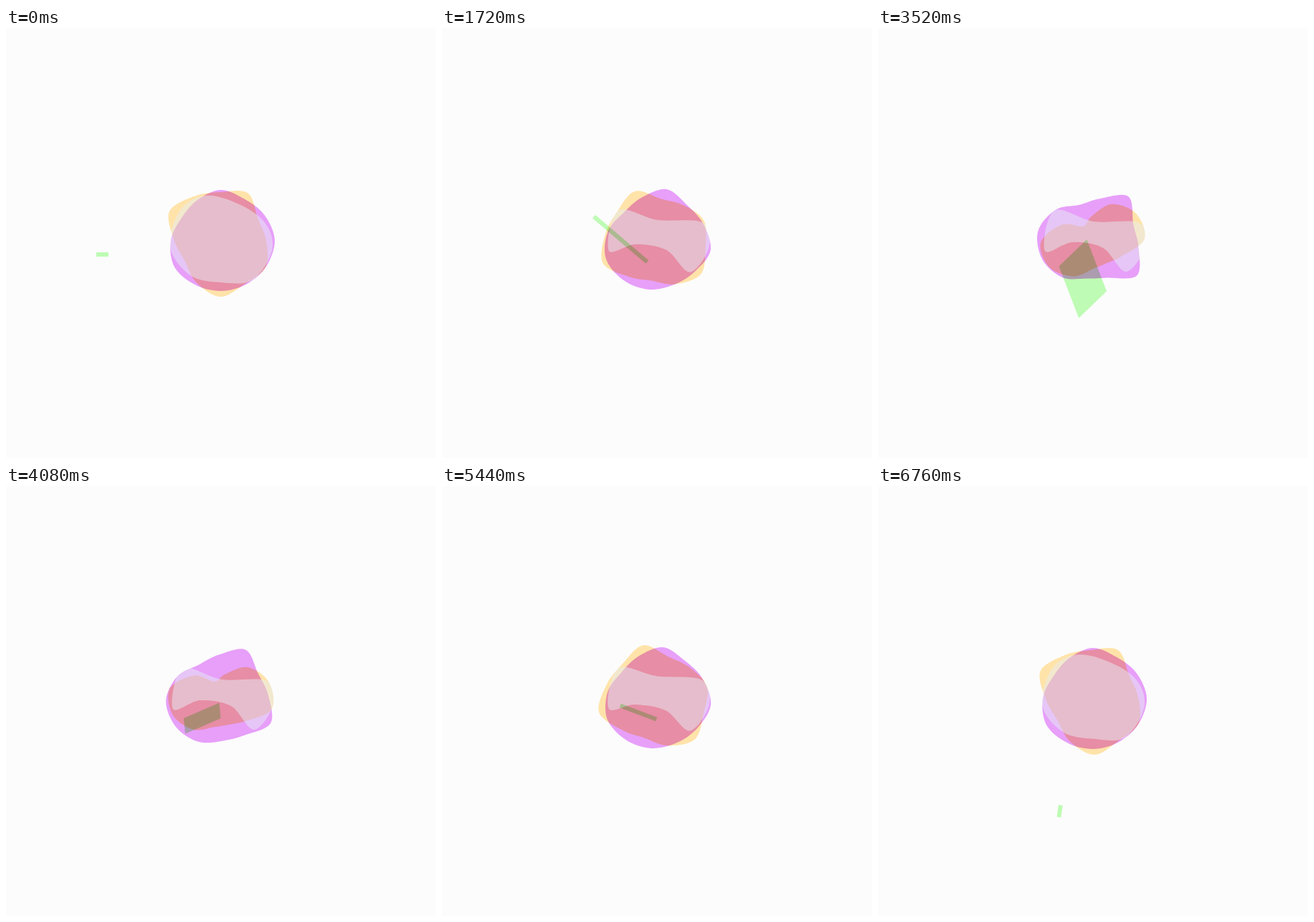
An HTML page with a canvas that plays this animation: 600 px wide and 600 px high, repeating every 6.8 s.

```html
<!DOCTYPE html>
<html>
<head>
<meta charset="utf-8">
<style>
html, body { margin: 0; height: 100%; overflow: hidden; background: #fcfcfc; }
canvas { display: block; }
</style>
</head>
<body>
<canvas id="c" width="600" height="600"></canvas>
<script>
const ctx = document.getElementById('c').getContext('2d');
const LOOP = 6800, HALF = LOOP / 2, RAD = Math.PI / 180;

const clamp = x => Math.max(0, Math.min(1, x));
const mix = (a, b, k) => a + (b - a) * k;
const ease = x => x < .5 ? 2 * x * x : 1 - 2 * (1 - x) * (1 - x);
const smooth = (a, b, x) => { const k = clamp((x - a) / (b - a)); return k * k * (3 - 2 * k); };

// Two blobs turn while their radii, taken at equal angles, morph
const orange = {
  x: 299, y: 297, turn: -95, color: '#ffe3a9',
  from: [64, 73, 69, 78, 67, 57, 64, 82, 72, 68, 77, 61],
  to: [34, 58, 72, 73, 46, 37, 39, 56, 70, 72, 48, 24],
  spin: p => p ** .85, morph: p => smooth(.45, .85, p)
};
const purple = {
  x: 300, y: 296, turn: 42, color: '#e79ff9',
  from: [75, 73, 71, 71, 72, 75, 70, 63, 65, 70, 66, 70],
  to: [79, 55, 53, 67, 76, 78, 67, 52, 58, 79, 60, 64],
  spin: p => p * p, morph: p => p * p
};

// The light patch narrows from a disc to a wavy band
const disc = [[288, 234], [352, 262], [372, 305], [345, 351], [300, 355], [257, 345], [229, 305], [245, 252]];
const band = [[301, 270], [364, 272], [373, 305], [346, 340], [314, 307], [271, 299], [233, 311], [246, 255]];

function fillSmooth(pts, color, mode) {
  const n = pts.length, at = i => pts[(i + n) % n];
  ctx.beginPath();
  ctx.moveTo(...pts[0]);
  pts.forEach((b, i) => {
    const a = at(i - 1), c = at(i + 1), d = at(i + 2);
    ctx.bezierCurveTo(
      b[0] + (c[0] - a[0]) / 6, b[1] + (c[1] - a[1]) / 6,
      c[0] - (d[0] - b[0]) / 6, c[1] - (d[1] - b[1]) / 6, ...c);
  });
  ctx.globalCompositeOperation = mode;
  ctx.fillStyle = color;
  ctx.fill();
}

function blob(s, p) {
  const k = s.morph(p), turn = s.turn * s.spin(p), step = 360 / s.from.length;
  const pts = s.from.map((r0, i) => {
    const r = mix(r0, s.to[i], k), a = (i * step + turn) * RAD;
    return [s.x + r * Math.cos(a), s.y + r * Math.sin(a)];
  });
  fillSmooth(pts, s.color, 'multiply');
}

function patch(p) {
  const k = 1 - (1 - p) ** 4;
  const pts = disc.map(([x, y], i) => [mix(x, band[i][0], k), mix(y, band[i][1], k)]);
  fillSmooth(pts, 'rgba(230,238,244,.5)', 'source-atop');
}

// Piecewise value through [time, value] keys
function track(t, keys, curve = ease) {
  const i = Math.max(1, keys.findIndex(k => k[0] >= t));
  const [t0, a] = keys[i - 1], [t1, b] = keys[i];
  return mix(a, b, curve(clamp((t - t0) / (t1 - t0))));
}

// Green bar: turns about a pivot, slides, and opens into a sheared panel
function bar(t) {
  const spin = track(t, [[0, 0], [1300, 18], [2520, 83], [3520, 136], [4720, 180], [5700, 208], [LOOP, 281]], x => x);
  const far = track(t, [[0, 148], [1080, 148], [2300, 27], [5700, 27], [LOOP, 148]]);
  const near = track(t, [[0, 131], [1000, 0], [2300, -27], [5700, -27], [LOOP, 131]]);
  const open = track(t, [[0, 0], [2300, 0], [HALF, 1], [4420, 0], [LOOP, 0]]);
  const top = -3 - 67 * open, shift = 31 * open;
  ctx.save();
  ctx.translate(274, 316);
  ctx.rotate(spin * RAD);
  ctx.beginPath();
  ctx.moveTo(-far, 3);
  ctx.lineTo(-near, 3);
  ctx.lineTo(-near + shift, top);
  ctx.lineTo(-far + shift, top);
  ctx.globalCompositeOperation = 'multiply';
  ctx.fillStyle = '#befbb4';
  ctx.fill();
  ctx.restore();
}

function draw(t) {
  const p = 1 - Math.abs(t / HALF - 1);
  ctx.clearRect(0, 0, 600, 600);
  blob(orange, p);
  blob(purple, p);
  patch(p);
  bar(t);
}

const start = performance.now();
function frame() {
  draw((performance.now() - start) % LOOP);
  requestAnimationFrame(frame);
}
frame();
</script>
</body>
</html>
```
